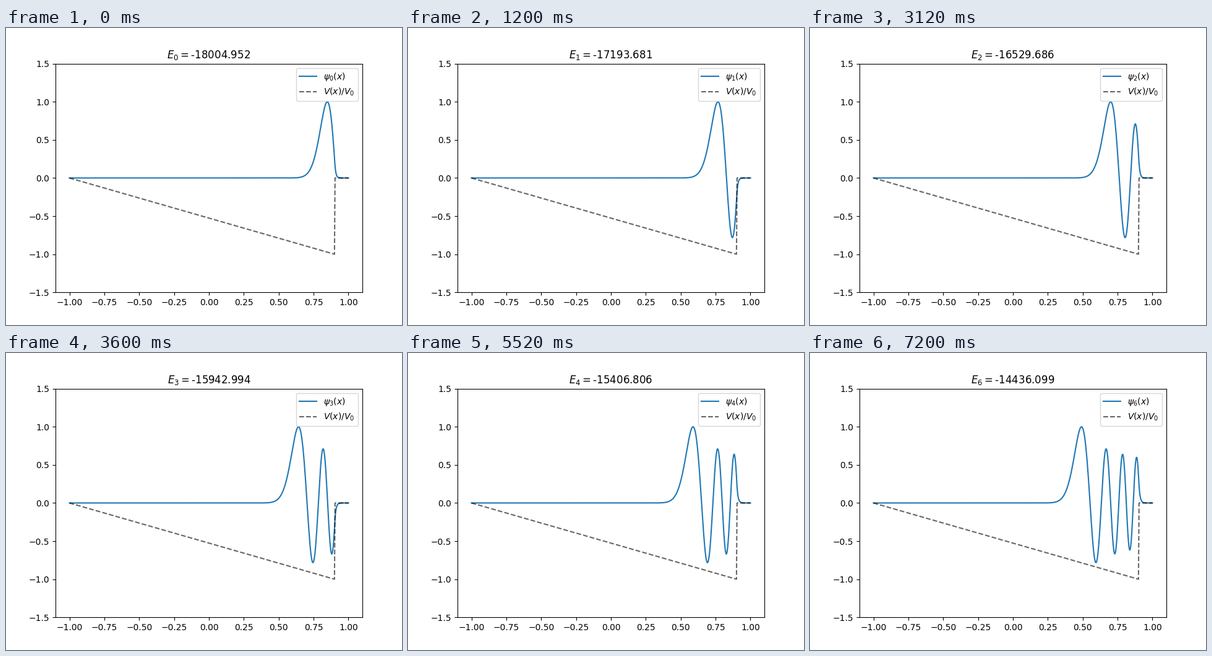
Write a matplotlib script that moves like this. It is 640 px wide and 480 px high and loops after 8000 ms.

```python
import numpy as np
import matplotlib.pyplot as plt
from matplotlib.animation import FuncAnimation

POINTS = 500
SLOPE = 10000.0
EDGE = 0.9
DEPTH = SLOPE * (EDGE + 1)
ENERGIES = [-18004.952, -17193.681, -16529.686, -15942.994,
            -15406.806, -14907.279, -14436.099]
INTERVAL = 400
HOLD = 3    # ticks per state
TICKS = 20

x = np.linspace(-1, 1, POINTS)
potential = np.where(x <= EDGE, -SLOPE * (x + 1), 0.0)


def bound_states(count):
    """Lowest solutions of -psi'' + V psi = E psi, scaled to a peak of 1."""
    step = x[1] - x[0]
    off = np.full(POINTS - 1, -1 / step**2)
    ham = np.diag(2 / step**2 + potential) + np.diag(off, 1) + np.diag(off, -1)
    states = np.linalg.eigh(ham)[1][:, :count].T
    peaks = [psi[np.argmax(np.abs(psi))] for psi in states]
    return states / np.array(peaks)[:, None]


states = bound_states(len(ENERGIES))

fig, ax = plt.subplots(figsize=(6.4, 4.8), dpi=100)
wave, = ax.plot(x, states[0], color="tab:blue", label=r"$\psi_0(x)$")
ax.plot(x, potential / DEPTH, "k--", alpha=0.6, label=r"$V(x)/V_0$")
ax.set_ylim(-1.5, 1.5)
title = ax.set_title("")
legend = ax.legend(loc="upper right")


def update(tick):
    n = tick // HOLD
    wave.set_ydata(states[n])
    title.set_text(rf"$E_{n}=${ENERGIES[n]:.3f}")
    legend.get_texts()[0].set_text(rf"$\psi_{n}(x)$")
    return wave, title, legend


anim = FuncAnimation(fig, update, frames=TICKS, interval=INTERVAL,
                     repeat=True, repeat_delay=0, blit=False)
plt.show()
```
